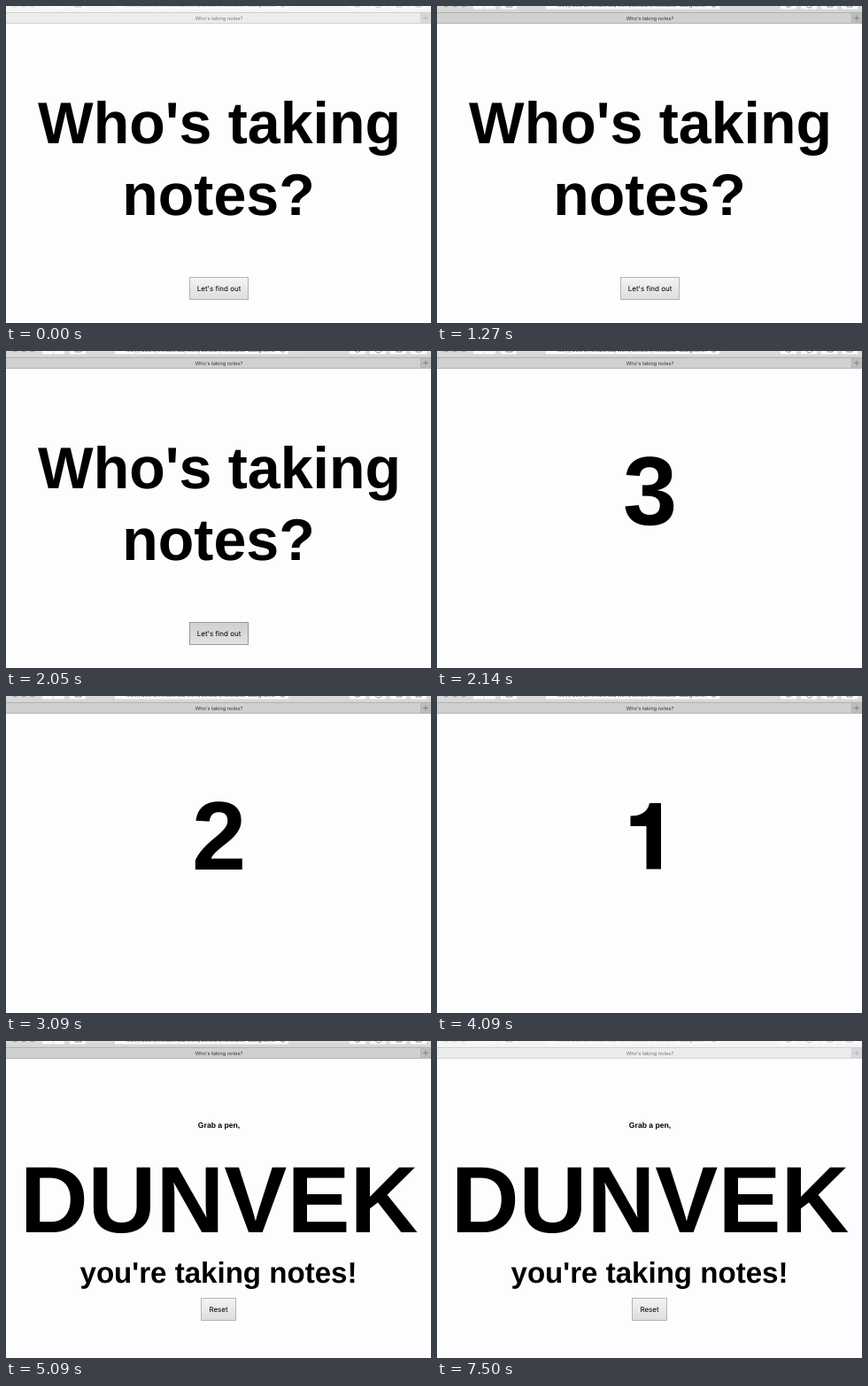
These frames come from a looping animation (480x358 px, 8690 ms). An HTML page:

```html
<!DOCTYPE html>
<html lang="en">
<head>
<meta charset="utf-8">
<style>
html, body { margin: 0; width: 100%; height: 100%; overflow: hidden; background: #fdfcff; }
svg { display: block; width: 100%; height: 100%; }
text { text-anchor: middle; text-rendering: geometricPrecision; }
.big { font-family: "Liberation Sans", Arial, sans-serif; font-weight: bold; }
.ui { font-family: Inter, sans-serif; }
.bar { fill: url(#active); }
.tabs { fill: #d1d0d1; }
.plus { fill: #bebdbe; }
.line { stroke: #b3b2b3; }
.field { fill: #fafafa; }
.icons { fill: none; stroke: #777; stroke-width: .8; }
.lights { fill: #c9c8c9; stroke: #979697; stroke-width: .8; }
.title { fill: #333; }
.url { fill: #555; }
.idle .bar { fill: #f5f4f5; }
.idle .tabs { fill: #ececec; }
.idle .plus { fill: #d8d7d8; }
.idle .line { stroke: #d2d1d2; }
.idle .icons { stroke: #b5b4b5; }
.idle .lights { fill: #e6e5e6; stroke: #d3d2d3; }
.idle .title { fill: #777; }
.idle .url { fill: #aaa; }
.button rect { fill: url(#up); stroke: #b4b3b5; }
.pressed rect { fill: url(#down); stroke: #999; }
</style>
</head>
<body>
<svg viewBox="0 0 480 358">
  <defs>
    <linearGradient id="active" x2="0" y2="1"><stop stop-color="#dddcdd"/><stop offset="1" stop-color="#d5d4d5"/></linearGradient>
    <linearGradient id="up" x2="0" y2="1"><stop stop-color="#f4f3f5"/><stop offset="1" stop-color="#dddcde"/></linearGradient>
    <linearGradient id="down" x2="0" y2="1"><stop stop-color="#cfced0"/><stop offset="1" stop-color="#e2e1e3"/></linearGradient>
  </defs>
  <rect width="480" height="358" fill="#fdfcff"/>

  <g id="chrome">
    <rect class="bar" width="480" height="8"/>
    <rect class="tabs" y="8" width="480" height="12"/>
    <rect class="plus" x="468" y="8" width="12" height="12"/>
    <path class="line" d="M0 7.5H480M0 19.5H480M468.5 8V20"/>
    <g class="lights"><circle cx="10" cy="-2" r="3"/><circle cx="20" cy="-2" r="3"/><circle cx="30" cy="-2" r="3"/></g>
    <path class="field" d="M41 0H53V3.5H41ZM54 0H66V3.5H54ZM72 0H90V3.5H72ZM123 0H319V3.5H123ZM388 0H406V3.5H388ZM411 0H429V3.5H411ZM434 0H452V3.5H434ZM457 0H475V3.5H457Z"/>
    <path class="icons" d="M78 0V1H85V0M310 0Q312.500 2.500 315 0M394 0Q397 3 400 0M417 0Q420.500 4 424 0M441 0V1H447V0M463 0V1H469V0M471 13.500H477M474 10.500V16.500"/>
    <text class="ui url" x="220" y="1.300" font-size="6">file:///Users/mirobenda/Work/Scratch/notetaker-assigner/in</text>
    <text class="ui title" x="240.500" y="15.500" font-size="5.600">Who's taking notes?</text>
  </g>

  <g id="intro">
    <g class="big" font-size="66.300">
      <text x="241" y="155">Who's taking</text>
      <text x="240" y="236">notes?</text>
    </g>
    <g class="button ui" id="start">
      <rect x="207.500" y="306.500" width="66" height="25"/>
      <text x="240.500" y="322" font-size="8">Let's find out</text>
    </g>
  </g>

  <g id="count">
    <text class="big" id="digit" x="240.500" y="195.500" font-size="110"></text>
    <path id="one" d="M253 121V195.500H236.500V147H218.500V135.500C230 135.500 238 131 240 121Z"/>
  </g>

  <g id="result">
    <g class="big">
      <text x="240.500" y="97.500" font-size="8.600">Grab a pen,</text>
      <text x="240.500" y="216" font-size="106.500">DUNVEK</text>
      <text x="240" y="273" font-size="33.100">you're taking notes!</text>
    </g>
    <g class="button ui">
      <rect x="220.500" y="290.500" width="39" height="25"/>
      <text x="240" y="306" font-size="8">Reset</text>
    </g>
  </g>
</svg>
<script>
const LOOP = 8690;
const el = id => document.getElementById(id);
const show = (id, on) => el(id).style.display = on ? '' : 'none';
const begin = performance.now();

function draw(now) {
  const t = Math.max(0, now - begin) % LOOP;
  const n = t < 3090 ? 3 : t < 4090 ? 2 : 1;
  el('chrome').classList.toggle('idle', t < 1270 || t >= 7500);
  el('start').classList.toggle('pressed', t >= 2050);
  show('intro', t < 2140);
  show('count', t >= 2140 && t < 5090);
  show('result', t >= 5090);
  el('digit').textContent = n > 1 ? n : '';
  show('one', n === 1);
  requestAnimationFrame(draw);
}
draw(begin);
</script>
</body>
</html>
```
